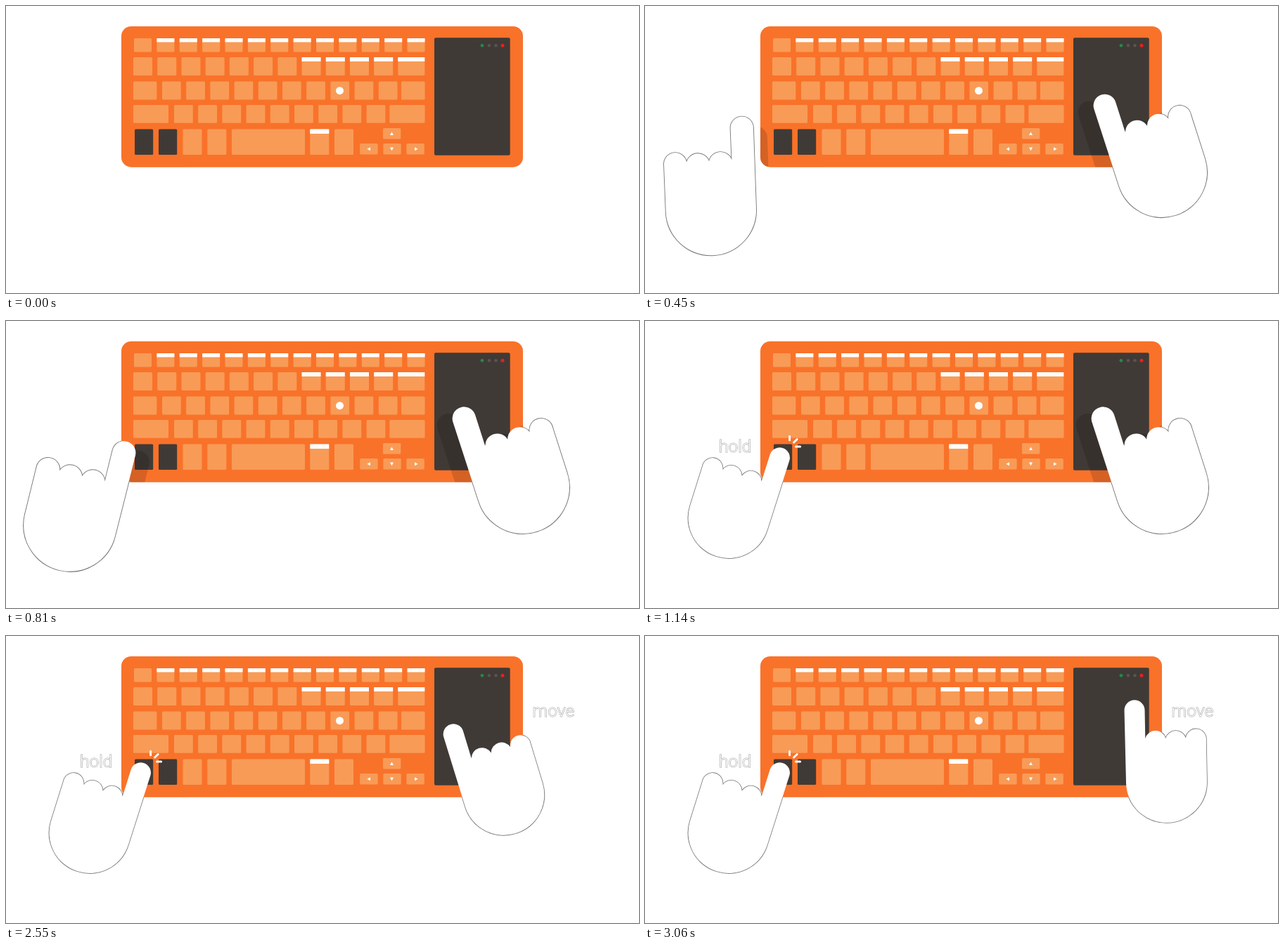
An HTML page that plays this animation: 900x409 px, repeating every 5510 ms.

```html
<!DOCTYPE html>
<html lang="en">
<head>
<meta charset="utf-8">
<title>Hold and move</title>
<style>
  html, body { margin: 0; width: 100%; height: 100%; overflow: hidden; background: #fff; }
  svg { display: block; width: 100%; height: 100%; }
  .outline { fill: #fff; stroke: #777; stroke-width: 1.6; vector-effect: non-scaling-stroke; }
  .shadow { opacity: .14; }
  .fill { fill: #fff; }
  .label {
    font: 300 24.5px Roboto, "Open Sans", sans-serif;
    fill: #fff; stroke: #999; stroke-width: 1.1; paint-order: stroke;
  }
</style>
</head>
<body>
<svg viewBox="0 0 900 409">
  <defs>
    <path id="hand" d="M-58-103.5A14.5 14.5 0 0 1-29-103.5V-63A15 15 0 0 1 0-62.5
      A15 15 0 0 1 28.7-62.5A14.5 14.5 0 0 1 57.5-59V0A57.5 57.5 0 0 1-57.5 0Z"/>
    <clipPath id="board"><rect x="164" y="29" width="571" height="200.7" rx="14"/></clipPath>
  </defs>

  <!-- Outlines lie under the keyboard so they only show on the page. -->
  <use href="#hand" class="outline left"/>
  <use href="#hand" class="outline right"/>

  <rect x="164" y="29" width="571" height="200.7" rx="14" fill="#f9722a"/>
  <g id="keys"></g>
  <circle cx="474.5" cy="120.7" r="5.5" fill="#fff"/>
  <g fill="#fff">
    <path d="M546 184h5l-2.5-4.6z"/>
    <path d="M546 201.6h5l-2.5 4.6z"/>
    <path d="M518 201.2v5l-4.6-2.5z"/>
    <path d="M581 201.2v5l4.6-2.5z"/>
  </g>
  <rect x="609" y="45.3" width="107.7" height="167.5" rx="2" fill="#403a36"/>
  <circle cx="677" cy="56.3" r="2.4" fill="#27874a"/>
  <circle cx="687" cy="56.3" r="2.3" fill="#5a5451"/>
  <circle cx="696.5" cy="56.3" r="2.3" fill="#5a5451"/>
  <circle cx="706" cy="56.3" r="2.5" fill="#e5211f"/>

  <g clip-path="url(#board)">
    <g class="shadow"><use href="#hand" class="left cast"/></g>
    <g class="shadow"><use href="#hand" class="right cast"/></g>
  </g>
  <use href="#hand" class="fill left"/>
  <use href="#hand" class="fill right"/>

  <g id="click" stroke="#fff" stroke-width="3" stroke-linecap="round">
    <path d="M205.6 169.8V164.2M211.6 173L216.2 168.5M214.6 179H220.6"/>
  </g>
  <text id="hold" class="label" x="105" y="187">hold</text>
  <text id="move" class="label" x="748.5" y="114.5">move</text>
</svg>
<script>
const LOOP = 5510, STEP = 30;
const $ = id => document.getElementById(id);
const all = name => [...document.querySelectorAll(name)];

// Keyboard
const KEY = '#f89b57', DARK = '#403a36';

function rect(x, y, w, h, fill, rx = 1.5) {
  const node = document.createElementNS('http://www.w3.org/2000/svg', 'rect');
  Object.entries({ x, y, width: w, height: h, fill, rx })
    .forEach(([name, value]) => node.setAttribute(name, value));
  $('keys').append(node);
}

function key(x, y, w, h, cap = 0, color = KEY) {
  rect(x, y, w, h, color);
  if (cap) rect(x, y, w, cap, '#fff', .5);
}

function row(count, x, y, pitch, w, h, cap = () => 0) {
  for (let i = 0; i < count; i++) key(x + i * pitch, y, w, h, cap(i));
}

row(13, 182, 46, 32.38, 25, 19.5, i => i > 0 ? 5.5 : 0);
row(11, 181, 73, 34.22, 27, 26, i => i > 6 ? 6 : 0);
key(557.3, 73, 38, 26, 6);
key(181, 107.5, 33.3, 26);
row(10, 222, 107.5, 34.2, 26.7, 26);
key(562, 107.5, 33.5, 26);
key(181, 141, 50, 25.7);
row(9, 239, 141, 34.2, 26.8, 25.7);
key(545.3, 141, 50.2, 25.7);
key(183, 175.5, 26.2, 36.5, 0, DARK);
key(217, 175.5, 26.2, 36.5, 0, DARK);
row(2, 251.5, 175.5, 34.8, 27, 36.5);
key(321, 175.5, 104, 36.5);
key(432.3, 175.5, 27, 36.5, 6.5);
key(467, 175.5, 27, 36.5);
key(536, 174, 25.3, 15.5);
row(3, 503.2, 196, 33.1, 25.4, 15.6);

// Motion: a pose is [x, y, degrees, scale, lift]
const LEFT = {
  start: [97, 291, -16, 1.15, 1],
  hover: [90.2, 291.3, 13.75, 1.15, 1],
  press: [119, 280.5, 17.4, 1, 0]
};
const RIGHT = {
  hover: [735, 237, -17.7, 1.148, 1],
  press: [707.5, 226.5, -17, 1, 0],
  moved: [741.5, 208.5, -1.1, 1, 0]
};

const span = (from, to, t) => Math.min(1, Math.max(0, (t - from) / (to - from)));
const ease = (from, to, t) => { const p = span(from, to, t); return p * p * (3 - 2 * p); };
const mix = (a, b, k) => a.map((v, i) => v + (b[i] - v) * k);

function place(side, pose, grow, mirror, castX, castY) {
  const [x, y, angle, scale, lift] = pose;
  const s = scale * grow;
  const at = (dx, dy) =>
    `translate(${x + dx} ${y + dy}) rotate(${angle}) scale(${s * mirror} ${s})`;
  for (const node of all('.' + side)) {
    const cast = node.classList.contains('cast');
    node.setAttribute('transform', cast ? at(castX * lift, castY * lift) : at(0, 0));
    node.style.visibility = s > 0 ? 'visible' : 'hidden';
  }
}

const show = (id, on) => { $(id).style.display = on ? '' : 'none'; };

function draw() {
  const t = Math.floor((performance.now() % LOOP) / STEP) * STEP;
  const grow = 1 - (1 - span(180, 750, t)) ** 5.5;

  let left = mix(LEFT.start, LEFT.hover, ease(180, 750, t));
  left = mix(left, LEFT.press, ease(780, 1080, t));
  place('left', left, grow, -1, 20, 14);

  let right = mix(RIGHT.hover, RIGHT.press, ease(2070, 2370, t));
  right = mix(right, RIGHT.moved, ease(2520, 3060, t));
  place('right', right, grow, 1, -22, 9.5);

  show('click', t >= 1080);
  show('hold', t >= 1080);
  show('move', t >= 2370);
  requestAnimationFrame(draw);
}
draw();
</script>
</body>
</html>
```
